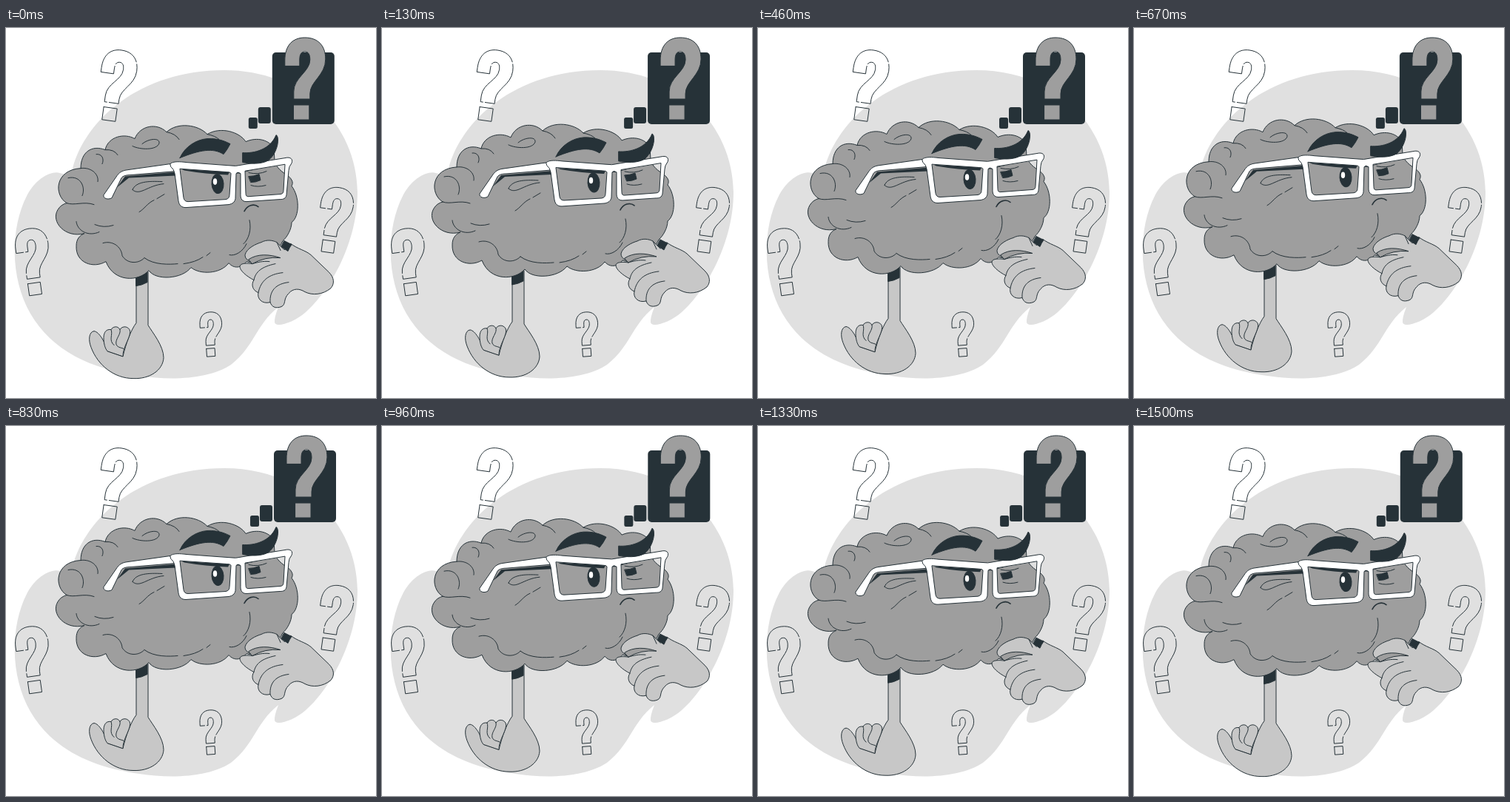
An HTML page that plays this animation: 500 by 500 pixels, repeating every 1540 ms.

```html
<!DOCTYPE html>
<html lang="en">
<head>
<meta charset="utf-8">
<title>Thinking brain</title>
<style>
  html, body { margin: 0; width: 100%; height: 100%; overflow: hidden; background: #fff; }
  svg { display: block; width: 100%; height: 100%; }
  .line { fill: none; stroke: #263238; stroke-width: 1; stroke-linecap: round; stroke-linejoin: round; }
  .dark { fill: #263238; }
  .grey { fill: #9e9e9e; }
  .skin { fill: #c7c7c7; }
  .white { fill: #fff; }
  .outlines { stroke-dasharray: 74 3; }
</style>
</head>
<body>
<svg viewBox="0 0 500 500">
  <defs>
    <path id="mark" d="M-27-18V-25C-27-46-16-56 0-56C18-56 28-45 28-27C28-5 7 3 7 20V27H-15V17C-15-2 7-10 7-26C7-33 5-37 0-37C-5-37-7-33-7-26V-18ZM-15 35H6V55H-15Z" vector-effect="non-scaling-stroke"/>
  </defs>

  <path fill="#e0e0e0" d="M90 190C107 125 180 57 295 57C400 57 474 130 475 222C475 290 438 355 405 384C388 399 363 406 363 397C363 390 366 383 368 377C337 402 336 430 304 455C276 474 225 477 180 470C115 461 62 436 33 386C5 337 6 270 28 227C40 203 62 192 73 196Q82 200 90 190Z"/>

  <g class="line outlines">
    <use href="#mark" transform="translate(149.3 78.2) rotate(8) scale(.87)"/>
    <use href="#mark" transform="translate(37.5 316) rotate(-8) scale(.81)"/>
    <use href="#mark" transform="translate(444 260) rotate(8) scale(.8)"/>
    <use href="#mark" transform="translate(277.5 414) rotate(-4) scale(.54)"/>
  </g>

  <g id="bubble">
    <rect class="dark" x="360" y="33" width="84" height="97" rx="5"/>
    <rect class="dark" x="341" y="107" width="17" height="22" rx="3"/>
    <rect class="dark" x="328" y="121" width="12" height="15" rx="2.5"/>
    <use class="line" href="#mark" x="404" y="69" style="fill:#9e9e9e"/>
  </g>

  <g id="brain" class="line">
    <!-- standing arm -->
    <path class="skin" d="M176 330V399C169 408 162 427 158 444L137 437C134 425 126 411 119 410C112 411 111 422 115 432C124 456 146 474 172 474C194 475 212 463 213 446C213 430 198 412 192 402V330Z"/>
    <path class="skin" d="M158 444C157 432 171 415 167 408C163 402 156 404 154 408C151 402 144 404 142 408C136 407 132 411 132 419C132 427 134 434 137 437ZM142 408C145 415 138 422 146 429M154 408C156 414 147 421 149 428C151 433 157 432 159 434"/>
    <path class="dark" d="M176 330H191V344Q184 348 176 349Z"/>

    <path class="grey" d="M82 237C64 226 66 192 101 190C101 168 116 158 134 165C138 147 160 142 174 150C181 132 204 128 217 141C232 127 260 131 272 144C290 133 316 141 324 154C340 147 356 152 362 163L363 180C365 189 373 195 381 200C388 206 388 210 386 214C397 228 397 255 386 263C386 272 380 283 374 288C365 308 340 322 325 316C318 325 308 326 301 318C290 333 262 334 250 324C238 340 202 342 193 328C180 343 146 345 135 316C118 326 94 318 95 295C95 286 99 281 106 278C80 285 60 262 70 246Q74 239 82 237Z"/>
    <path d="M84 203C101 199 108 216 103 227M101 190C115 188 126 198 124 208M82 237C92 241 105 234 119 239M95 262C96 274 111 283 126 276M120 266Q132 271 145 267M131 291C144 287 156 296 157 308C164 320 180 319 187 311M187 311C200 321 221 320 232 319M240 319Q256 317 266 310M271 308L276 304M171 160C181 165 204 166 207 156C208 148 192 150 184 157M134 165Q146 164 151 172M122 171C130 170 133 178 130 184M171 219C175 208 192 207 211 208M171 219C181 228 191 213 213 211M180 249C187 245 191 237 200 233M204 231L214 225M217 141Q229 143 234 151M272 144Q283 146 288 151M329 260C332 273 328 286 321 292M325 292C320 303 309 309 302 307"/>
    <path stroke-width="1.6" d="M322 248C326 240 335 237 341 242"/>

    <!-- eyes -->
    <ellipse class="dark" cx="286" cy="211" rx="8" ry="13" transform="rotate(-4 286 211)"/>
    <ellipse class="white" cx="282.500" cy="208" rx="2.700" ry="4.300" stroke="none"/>
    <path class="dark" d="M328 201Q335 201 342 198L344 206Q338 209 331 209Z"/>
    <path d="M331 213Q340 216 351 213M328 196Q341 199 352 194"/>

    <!-- glasses -->
    <path class="dark" stroke="none" d="M150 216L161 201L231 195L229 200L166 203ZM235 190L303 193L300 199Q270 198 241 193ZM306 192L321 191L318 197L309 197ZM322 192L350 186L340 191L323 195Z"/>
    <path class="white" d="M229 183L165 192C156 193 153 196 150 200L132 226C131 231 138 233 143 230L156 203C158 200 163 199 168 199L229 194Z"/>
    <path class="white" fill-rule="evenodd" d="M222 184C225 180 236 181 244 182L299 186Q311 188 321 185L377 176C385 174 388 178 386 183Q382 188 382 193L379 226C378 231 375 232 370 232L325 235C319 235 317 231 317 226V197Q313 194 311 197L310 231C309 236 306 238 301 239L243 243C237 243 234 240 233 234L228 197Q227 191 223 188ZM235 191L240 230Q241 235 246 235L297 232Q302 231 302 226L304 197Q304 195 299 195ZM323 194L324 224Q324 229 329 228L370 225Q375 225 375 220L377 185Z"/>

    <!-- brows -->
    <path class="dark" d="M235 176C242 160 258 151 272 150C288 149 299 155 303 157Q299 165 294 171C280 162 262 165 235 176Z"/>
    <path class="dark" d="M320 169C335 170 357 165 365 145C370 147 368 168 355 179C345 185 330 184 320 182Z"/>

    <!-- chin hand -->
    <path class="skin" d="M385 292C394 299 405 301 412 307L436 330C444 338 444 346 439 352C428 361 414 362 404 357C396 352 388 352 382 359C374 367 379 374 372 377C364 380 359 377 357 371C346 374 339 366 341 358C333 355 331 347 335 341C325 336 316 328 316 323C316 318 325 318 333 319C329 314 323 314 323 307C325 298 338 292 345 290C352 286 360 287 366 290L376 300Z"/>
    <path class="grey" d="M328 313C340 305 356 306 371 311Q350 309 333 319Z"/>
    <path d="M366 290L371 301M333 319C340 317 347 315 356 316M335 341C337 330 345 323 364 319M341 358C344 342 355 333 374 331M357 371C356 356 364 346 382 344"/>
    <path class="dark" d="M376 288L386 293Q383 297 381 302L372 296Z"/>
  </g>
</svg>
<script>
  const FPS = 24, LOOP = 1540, STEPS = 36;
  const SHAKE = [0, -1, 2, -4, 4, -4, 4, -4, 2, -1, 0];
  const brain = document.getElementById("brain");
  const bubble = document.getElementById("bubble");

  function shakeAt(phase) {
    const i = Math.floor(phase * 10);
    return SHAKE[i] + (SHAKE[i + 1] - SHAKE[i]) * (phase * 10 - i);
  }

  function draw(now) {
    const time = now % LOOP;
    const step = Math.min(STEPS, Math.floor((time + 5) * FPS / 1000));
    const phase = (step + 0.7) / STEPS % 1;
    const lift = 10 * (1 - Math.abs(2 * phase - 1));
    brain.setAttribute("transform", `translate(0 ${-lift})`);
    bubble.setAttribute("transform", `translate(${shakeAt(phase)} 0)`);
  }

  const start = performance.now();
  function tick() {
    draw(performance.now() - start);
    requestAnimationFrame(tick);
  }
  tick();
</script>
</body>
</html>
```
